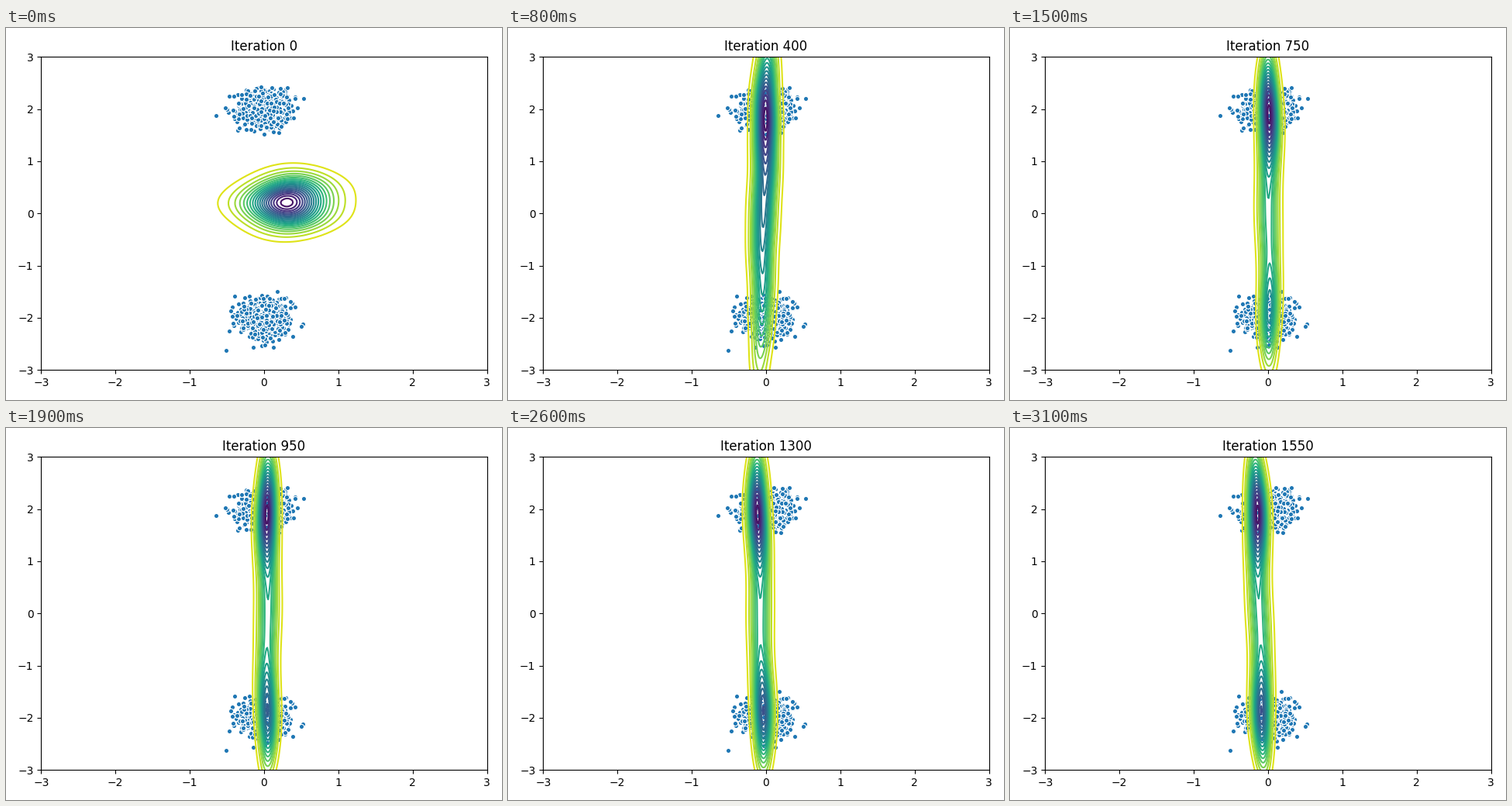
A matplotlib script for the animation above (5100 ms loop, 640x480 px).

```python
import numpy as np
import matplotlib.pyplot as plt
from matplotlib.animation import FuncAnimation

STEP, LAST = 50, 1550
TICKS = 51  # 100 ms each; the last state is held for two seconds

# Where the cloud's ridge stands and how far it leans, at a few iterations
KEY_ITERS = [0, 200, 400, 600, 950, 1300, 1550]
SHIFT = [.32, .01, -.03, -.01, .045, -.075, -.115]
LEAN = [.06, .002, .015, -.003, 0, -.016, -.017]

X, Y = np.meshgrid(np.linspace(-1, 1.6, 230), np.linspace(-3.6, 3.6, 190))
LEVELS = np.linspace(.05, .95, 19)


def bell(v, mid, spread):
    return np.exp(-.5 * ((v - mid) / spread) ** 2)


def ease(it, start, end):
    t = np.clip((it - start) / (end - start), 0, 1)
    return t * t * (3 - 2 * t)


def density(it):
    """One cloud stretches into a tube, then gathers at both targets."""
    young = np.exp(-it / 135)
    split = ease(it, 200, 550)
    top, low = .88 * split, .65 * ease(it, 200, 1100)
    mid = 1 - .62 * split
    mid_y = np.interp(it, [0, 200, 600], [.21, .65, 0])
    mid_s = np.interp(it, [0, 200, 600], [.31, 2.6, 1.2])
    height = (top * bell(Y, 1.97, .65) + mid * bell(Y, mid_y, mid_s)
              + low * bell(Y, -1.95, .63))

    ridge = (np.interp(it, KEY_ITERS, SHIFT) + np.interp(it, KEY_ITERS, LEAN) * Y
             + .008 * np.sin(2.3 * Y + it / 70)
             + .03 * young * np.sin(6 * Y - 3))
    width = (.08 + .295 * young) * (1 + .25 * top * bell(Y, 0, 1))
    u = (X - ridge) / width
    z = height * (.6 * bell(u, 0, .77) + .4 * bell(u, 0, 1.2))
    return .98 * z / z.max()


fig, ax = plt.subplots(figsize=(6.4, 4.8), dpi=100)
rng = np.random.default_rng(4)
for y in (2, -2):
    ax.scatter(*rng.normal((0, y), .16, (1000, 2)).T, s=20,
               color="#1f77b4", edgecolor="white", linewidth=.8)
ax.set(xlim=(-3, 3), ylim=(-3, 3))
title = ax.set_title("Iteration 0")
fig.tight_layout()
drawn = []


def show(tick):
    it = min(tick * STEP, LAST)
    while drawn:
        drawn.pop().remove()
    drawn.append(ax.contour(X, Y, density(it), LEVELS, cmap="viridis_r",
                            vmin=0, vmax=1, linewidths=1.5))
    title.set_text(f"Iteration {it}")
    return []


anim = FuncAnimation(fig, show, frames=TICKS, init_func=lambda: show(0),
                     interval=100, repeat=True, repeat_delay=0)
plt.show()
```
